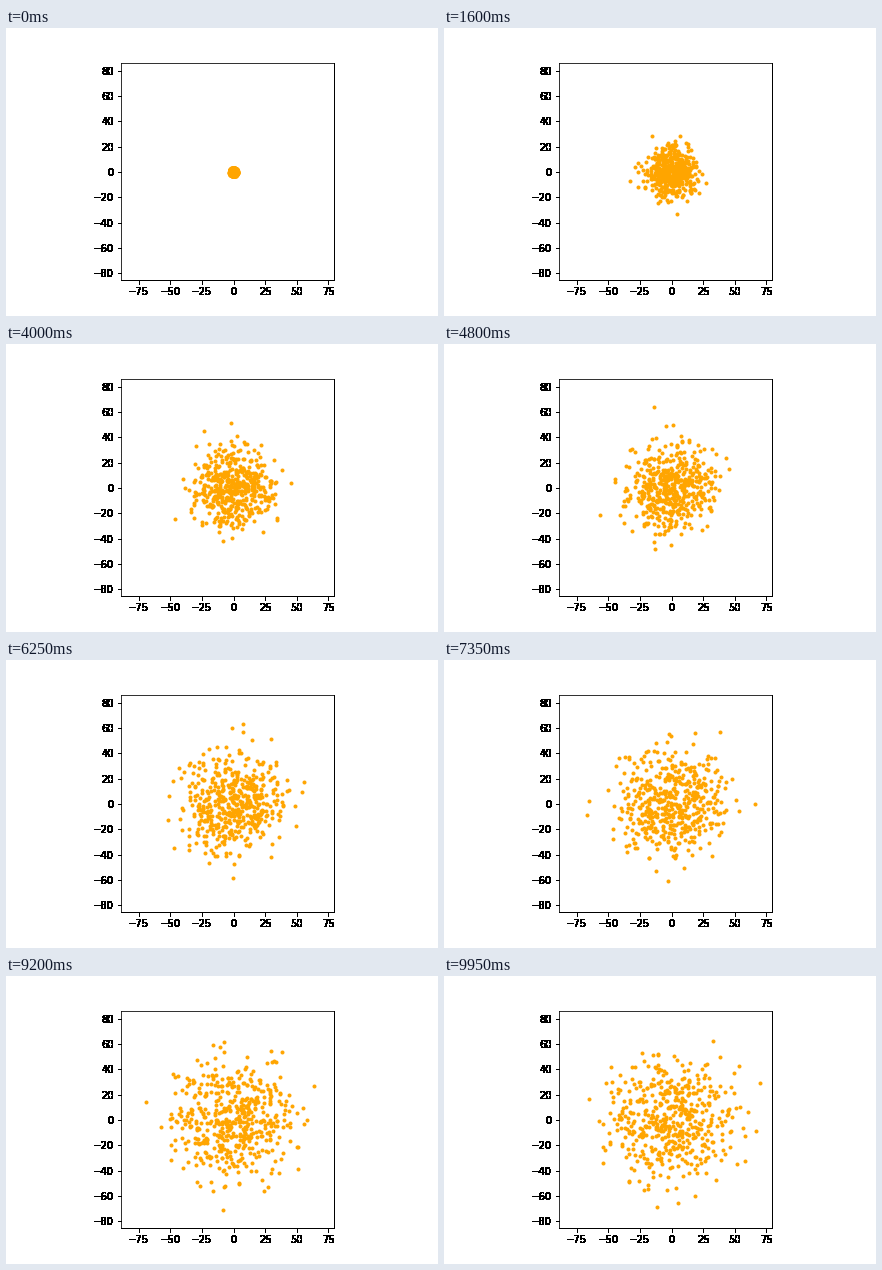
These frames come from a looping animation (432 px wide and 288 px high, 10 s). A matplotlib script:

```python
import numpy as np
import matplotlib.pyplot as plt
from matplotlib.animation import FuncAnimation

W, H, DPI = 432, 288, 72
FRAMES, INTERVAL = 200, 50
COUNT, STEP, REACH = 500, 3.5, 80


def random_walks(rng, count):
    """Walks of shape (count, FRAMES, 2), each step uniform in a disc."""
    shape = (count + 50, FRAMES)
    angle = rng.uniform(0, 2 * np.pi, shape)
    length = STEP * np.sqrt(rng.uniform(0, 1, shape))
    x = (length * np.cos(angle)).cumsum(axis=1)
    y = (length * np.sin(angle)).cumsum(axis=1)
    inside = np.hypot(x, y).max(axis=1) < REACH
    return np.stack([x, y], axis=2)[inside][:count]


def harden(image, dpi):
    """Turn every pixel that holds any ink solid black."""
    solid = np.zeros_like(image)
    solid[..., 3] = image[..., 3] > 0
    return solid, 0, 0


walks = random_walks(np.random.default_rng(12), COUNT)

fig = plt.figure(figsize=(W / DPI, H / DPI), dpi=DPI, facecolor="white")
fig.subplots_adjust(left=0.125, right=0.9, bottom=0.125, top=0.88)
ax = fig.add_subplot()
ax.set_aspect("equal")
ax.set_xlim(-89.05, 79.35)
ax.set_ylim(-85.4, 86.5)
ax.set_xticks(range(-75, 76, 25))
ax.set_yticks(range(-80, 81, 20))

# Outside the white plot area, edges are not smoothed
for part in (ax.xaxis, ax.yaxis, ax.spines["bottom"], ax.spines["right"]):
    part.set_agg_filter(harden)

dots, = ax.plot([], [], ".", color="orange", markersize=6)


def draw(frame):
    dots.set_data(walks[:, frame, 0], walks[:, frame, 1])
    return dots,


anim = FuncAnimation(fig, draw, frames=FRAMES, interval=INTERVAL,
                     init_func=lambda: draw(0), repeat=True, repeat_delay=0)
plt.show()
```
